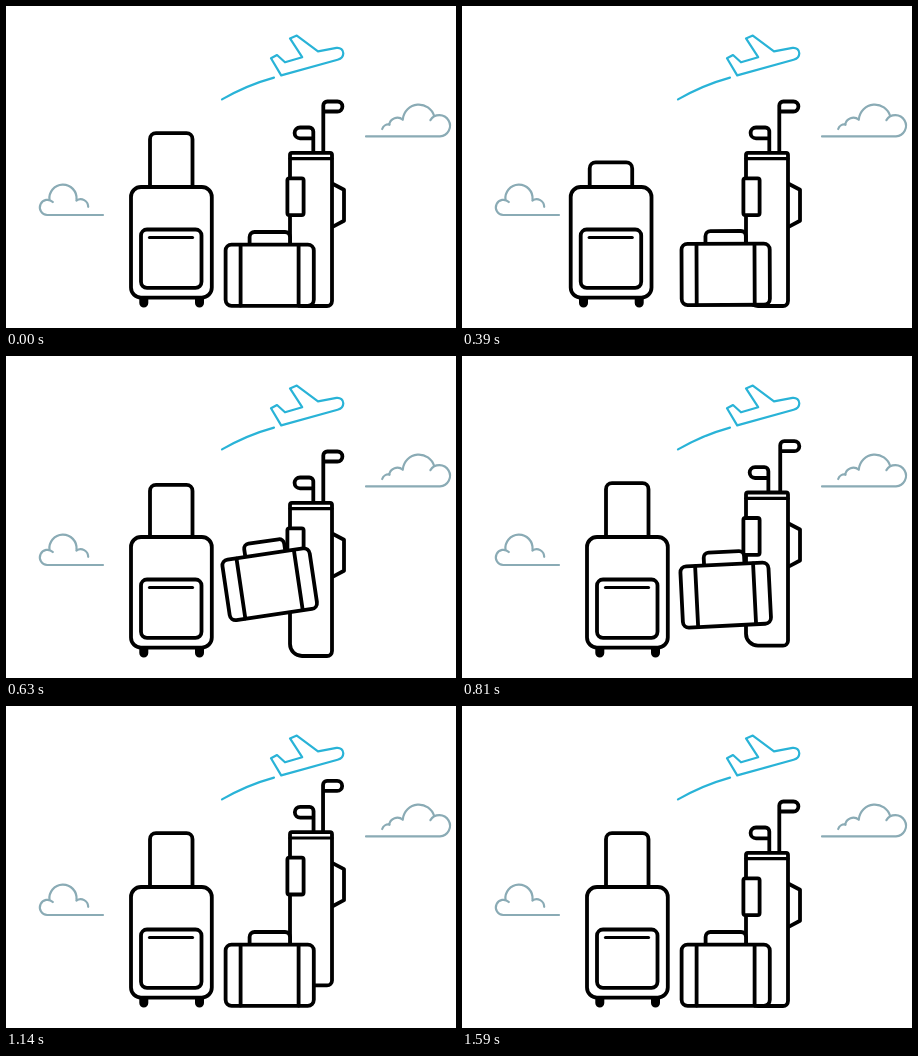
An HTML page that plays this animation: 450 by 322 pixels, repeating every 2.73 s.

```html
<!DOCTYPE html>
<html lang="en">
<head>
<meta charset="utf-8">
<title>Luggage</title>
<style>
  html, body { margin: 0; width: 100%; height: 100%; overflow: hidden; background: #fff; }
  svg { display: block; width: 100vw; height: 100vh; }
  path, rect { stroke-linecap: round; stroke-linejoin: round; }
  .ink { fill: #fff; stroke: #000; stroke-width: 3.8; }
  .thin { stroke-width: 3.2; }
  .bare { fill: none; }
  .cloud { fill: none; stroke: #8aabb5; stroke-width: 2.2; }
  .plane { fill: none; stroke: #29b3d7; stroke-width: 2.2; stroke-linejoin: miter; stroke-linecap: butt; }
</style>
</head>
<body>
<svg viewBox="0 0 450 322">
  <g class="cloud">
    <path d="M97 209H41.2a7.6 7.6 0 1 1 5.6-13M43.5 194.2a13.6 13.6 0 1 1 27-.8M70.4 194.5a7.6 7.6 0 0 1 11.8 6.3"/>
    <path d="M360 130.4H434a10.6 10.6 0 1 0-9.6-16.2M428.2 110.2a16 16 0 0 0-31.3 2.8M396.8 113.8a8.2 8.2 0 0 0-13.6 5M383.6 118.6a6.4 6.4 0 0 0-7.4 4.4"/>
  </g>
  <g class="plane">
    <path d="M265 52.2L271 49L279 56.3L296.2 51.2L284 32.4L290.8 29.6L312 45.4L330.5 41.9C334.5 41.4 337.3 44 337.3 47.3C337.3 50.4 335.2 52.8 331.6 53.8L275.2 69.4Z"/>
    <path d="M216 93.4Q241 79 268 71.6"/>
  </g>

  <g id="golf">
    <path id="shortClub" class="ink" d="M307.3 147V125.5a4 4 0 0 0-4-4H294a5.4 5.4 0 0 0 0 10.8H307.3"/>
    <path id="longClub" class="ink" d="M317.3 147V99.5a4 4 0 0 1 4-4H331.4a5 5 0 0 1 0 10H317.3"/>
    <path class="ink" d="M327 178L338 183.8V214.8L327 220.6"/>
    <path class="ink" d="M286 146.8H324a2 2 0 0 1 2 2V295a5 5 0 0 1-5 5H296a12 12 0 0 1-12-12V148.800a2 2 0 0 1 2-2Z"/>
    <path class="ink thin" d="M284 152.600H326"/>
    <rect class="ink" x="281.400" y="172.300" width="16.200" height="36.800" rx="2"/>
  </g>

  <g id="bag">
    <path class="ink" d="M243.600 238V231a5 5 0 0 1 5-5H279a5 5 0 0 1 5 5V238"/>
    <rect class="ink" x="219.600" y="238.600" width="88.200" height="61.200" rx="6"/>
    <path class="ink bare" d="M234.600 239V299.500M292.600 239V299.500"/>
  </g>

  <g id="trolley">
    <path d="M133.300 291h9v6a4.500 4.500 0 0 1-9 0zM189 291h9v6a4.500 4.500 0 0 1-9 0z"/>
    <path id="grip" class="ink"/>
    <rect class="ink" x="125" y="181" width="80.800" height="110.600" rx="10"/>
    <rect class="ink" x="135" y="223.500" width="60.500" height="58.300" rx="6"/>
    <path class="ink thin bare" d="M143.500 231.500H186.500"/>
  </g>
</svg>
<script>
  const LOOP = 2730, STEP = 30;

  // Each track is a list of [time, value] poses, joined by a sine ease.
  const tracks = {
    slide: [[0, 0], [300, -16.7], [370, -16.7], [570, 0]],
    drop:  [[0, 0], [225, 29.2], [385, 29.2], [675, 0]],
    lift:  [[360, 0], [685, -44], [1010, -1], [1110, 0]],
    tilt:  [[360, 0], [650, -8.5], [940, 1.2], [1110, 0]],
    hop:   [[690, 0], [1000, -31.5], [1350, 0]],
    sway:  [[690, 0], [970, 2.4], [1280, -2.2], [1580, 0]]
  };

  function at(name, t) {
    const track = tracks[name];
    if (t <= track[0][0]) return track[0][1];
    for (let i = 1; i < track.length; i++) {
      const [t0, v0] = track[i - 1], [t1, v1] = track[i];
      if (t < t1) {
        const k = (1 - Math.cos(Math.PI * (t - t0) / (t1 - t0))) / 2;
        return v0 + (v1 - v0) * k;
      }
    }
    return track[track.length - 1][1];
  }

  const el = id => document.getElementById(id);
  const parts = {};
  for (const id of ["golf", "shortClub", "longClub", "bag", "trolley", "grip"]) parts[id] = el(id);

  function place(id, x, y, turn = "") {
    parts[id].setAttribute("transform", `translate(${x} ${y}) ${turn}`);
  }

  function draw(t) {
    const top = 127.2 + at("drop", t), sway = at("sway", t);
    place("trolley", at("slide", t), 0);
    parts.grip.setAttribute("d",
      `M144 184V${top + 6}a6 6 0 0 1 6-6H180.500a6 6 0 0 1 6 6V184`);
    place("bag", 0, at("lift", t), `rotate(${at("tilt", t)} 263.700 269.200)`);
    place("golf", 0, at("hop", t));
    place("shortClub", -sway, 0);
    place("longClub", sway, 0);
  }

  const start = performance.now();
  function tick() {
    const t = (performance.now() - start) % LOOP;
    draw(Math.floor(t / STEP) * STEP);
    requestAnimationFrame(tick);
  }
  draw(0);
  requestAnimationFrame(tick);
</script>
</body>
</html>
```
